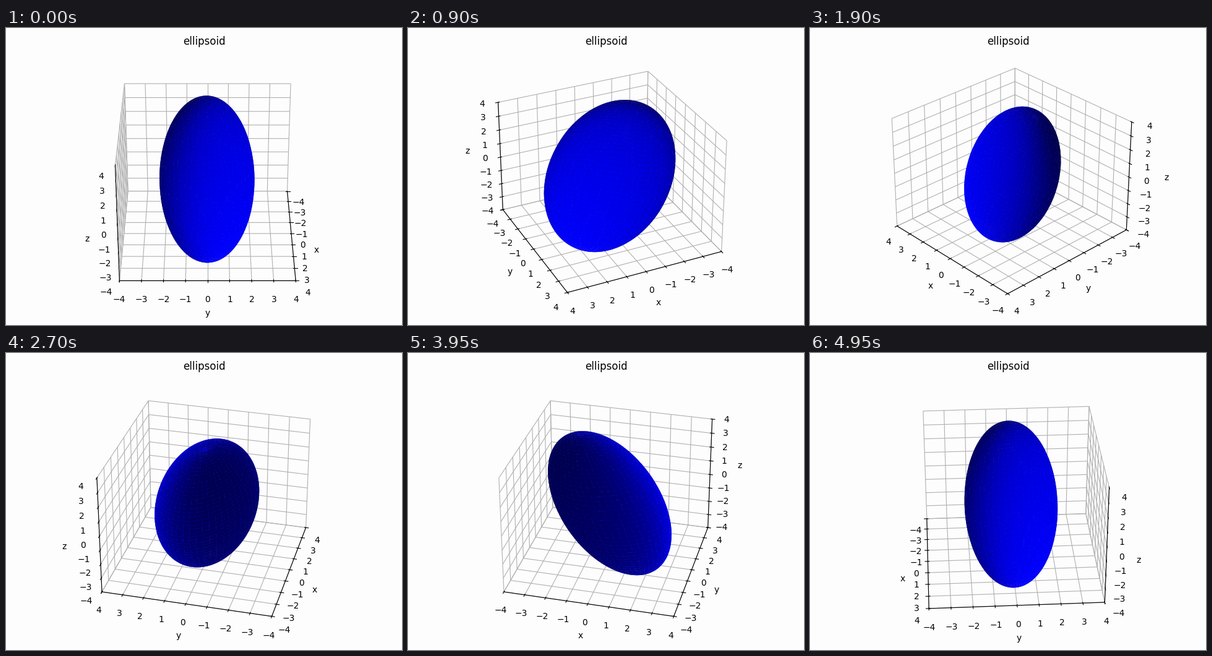
Animation of 640 by 480 pixels, one loop 5000 ms. Source, as a matplotlib script:

```python
import numpy as np
import matplotlib.pyplot as plt
from matplotlib.animation import FuncAnimation

WIDTH, HEIGHT, DPI = 640, 480, 100
FRAMES, INTERVAL = 100, 50
QUARTER = FRAMES // 4          # the layout repeats every 90 degrees
ELEV, STEP = 30, 360 / FRAMES
LIMIT = 4
PAD, TOP = 15, 35.33           # free space at the bottom and top, in pixels
BG = "#fdfdfd"

RADII = (3, 2, 5)
TILT = np.radians((2.6, -15.7, -24.2))


def rotation(rx, ry, rz):
    """Rotation matrix Rx @ Ry @ Rz."""
    (cx, cy, cz), (sx, sy, sz) = np.cos((rx, ry, rz)), np.sin((rx, ry, rz))
    about_x = np.array([[1, 0, 0], [0, cx, -sx], [0, sx, cx]])
    about_y = np.array([[cy, 0, sy], [0, 1, 0], [-sy, 0, cy]])
    about_z = np.array([[cz, -sz, 0], [sz, cz, 0], [0, 0, 1]])
    return about_x @ about_y @ about_z


def ellipsoid(count=100):
    u, v = np.meshgrid(np.linspace(0, 2 * np.pi, count),
                       np.linspace(0, np.pi, count))
    unit = np.array([np.cos(u) * np.sin(v), np.sin(u) * np.sin(v), np.cos(v)])
    matrix = rotation(*TILT) * np.array(RADII)
    return np.einsum("ij,jkl->ikl", matrix, unit)


def axes_of(ax):
    return ax.xaxis, ax.yaxis, ax.zaxis


def place(bottom):
    ax.set_position((0, bottom / HEIGHT, 1, (HEIGHT - TOP - bottom) / HEIGHT))


def lowest_label():
    fig.draw_without_rendering()
    return min(tick.label1.get_window_extent().y0
               for axis in axes_of(ax) for tick in axis.majorTicks)


def fit_bottom(azim):
    """Bottom margin that keeps every tick label inside the padding."""
    ax.view_init(ELEV, azim)
    bottom = PAD
    for _ in range(2):
        place(bottom)
        bottom = PAD + max(0, bottom - lowest_label())
    return bottom


fig = plt.figure(figsize=(WIDTH / DPI, HEIGHT / DPI), dpi=DPI, facecolor=BG)
ax = fig.add_axes((0, 0, 1, 1), projection="3d", facecolor=BG)


def style_axes():
    ticks = np.arange(-LIMIT, LIMIT + 1)
    ax.set(xlabel="x", ylabel="y", zlabel="z", title="ellipsoid",
           xticks=ticks, yticks=ticks, zticks=ticks)
    ax.set(xlim=(-LIMIT, LIMIT), ylim=(-LIMIT, LIMIT), zlim=(-LIMIT, LIMIT))
    for axis in axes_of(ax):
        axis.set_pane_color(BG)


style_axes()
bottoms = [fit_bottom(i * STEP) for i in range(QUARTER)]
ax.plot_surface(*ellipsoid(), color="b")
style_axes()


def update(i):
    place(bottoms[i % QUARTER])
    ax.view_init(ELEV, i * STEP)
    return ()


anim = FuncAnimation(fig, update, frames=FRAMES, interval=INTERVAL,
                     repeat=True, repeat_delay=0, blit=False)
plt.show()
```
